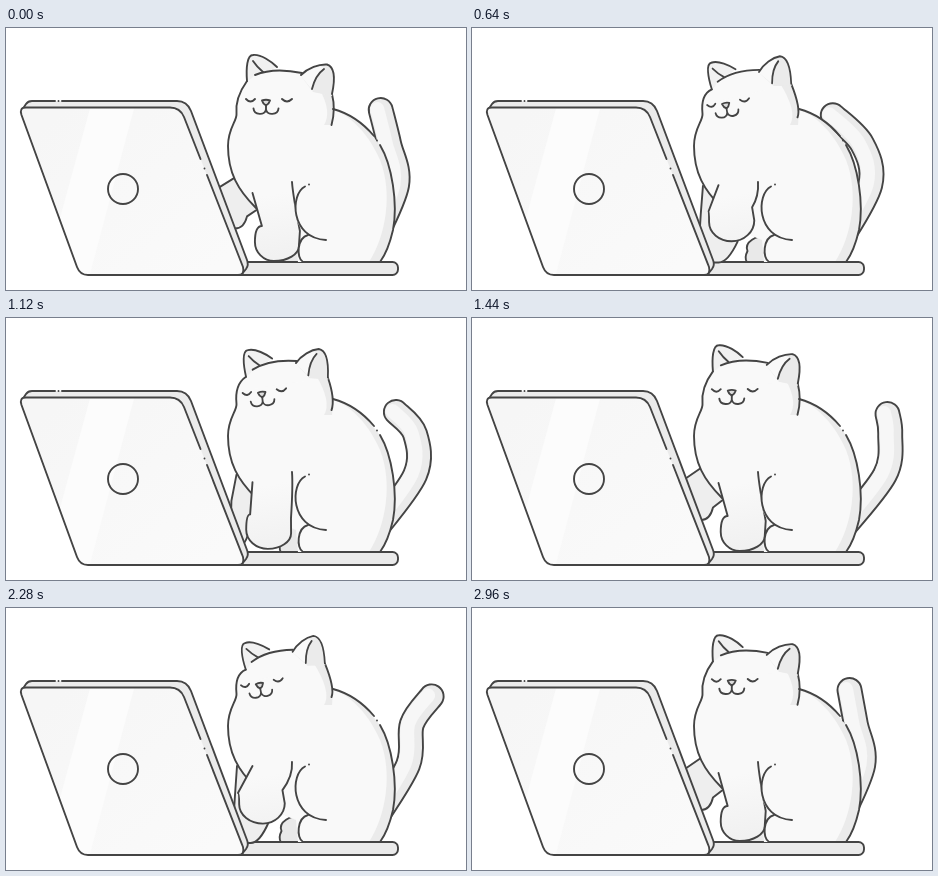
Animation, 460 px wide and 262 px high, one loop 3000 ms. Source, as an HTML page:

```html
<!DOCTYPE html>
<html lang="en">
<head>
<meta charset="utf-8">
<title>Cat kneading at a laptop</title>
<style>
html, body { margin: 0; width: 100%; height: 100%; overflow: hidden; background: #fff; }
svg { display: block; width: 460px; height: 262px; }
.line { stroke: #444; stroke-width: 1.9; }
</style>
</head>
<body>
<svg viewBox="0 0 460 262" fill="none" stroke-linecap="round" stroke-linejoin="round">
  <defs>
    <linearGradient id="legFill" gradientUnits="userSpaceOnUse" x1="258" y1="168" x2="270" y2="228">
      <stop offset="0" stop-color="#f9f9f9"/><stop offset="1" stop-color="#f1f1f1"/>
    </linearGradient>
    <linearGradient id="lidFill" gradientUnits="userSpaceOnUse" x1="60" y1="80" x2="200" y2="247">
      <stop offset="0" stop-color="#f6f6f6"/><stop offset="1" stop-color="#fafafa"/>
    </linearGradient>
  </defs>

  <path id="tailEdge" stroke="#444" stroke-width="25.9"/>
  <path id="tailShade" stroke="#ebebeb" stroke-width="22.1"/>
  <path id="tailLight" stroke="#f7f7f7" stroke-width="14" transform="translate(-3.5 -1)"/>
  <rect class="line" x="200" y="234" width="192" height="13" rx="5.5" fill="#eaeaea"/>
  <path id="farArm" class="line" fill="#eee"/>

  <g id="laptop">
    <path fill="#ebebeb" d="M16 83L20 76Q22 73 26 73H171Q181 73 185 83L241 232Q243 237 240 241L234 247Z"/>
    <path class="line" d="M16 82L20 76Q22 73 26 73H49M52.500 73h.01M56 73H171Q181 73 185 83L241 232Q243 237 240 241L236 246"/>
    <path fill="url(#lidFill)" d="M20 79.500H164Q174 79.500 178 89L237 239Q239 247 232 247H82Q74 247 71 239L15.500 87Q13 79.500 20 79.500Z"/>
    <path fill="#fcfcfc" d="M84 80.500H128L84 246H77Q73 244 71 237L54 190Z"/>
    <path class="line" d="M194.500 131L178 89Q174 79.500 164 79.500H20Q13 79.500 15.500 87L71 239Q74 247 82 247H232Q239 247 237 239L201 147M198.500 140.500h.01"/>
    <circle class="line" cx="117" cy="161" r="15"/>
  </g>

  <path class="line" fill="#e9e9e9" d="M297 208C284 207 272 214 275.500 223Q272 230 275 234H297"/>
  <path id="bodyShade" fill="#ebebeb"/>
  <path id="bodyLight" fill="#f9f9f9"/>
  <path id="chest" class="line"/>
  <path class="line" d="M327 81C342 85 357 95 368 108M371 112.500h.01M374 117C386 137 392 175 387 202C384 215 380 226 374 234"/>
  <path id="leg" class="line" fill="url(#legFill)"/>
  <path fill="#f9f9f9" d="M303 156C284 163 284 195 302 207C291 210 290 230 297 234H340V156Z"/>
  <path class="line" d="M303 156.500h.01M299 158.500C284 166 284 210 320 212M302 207C291 210 290 230 297 234H374"/>

  <g id="head">
    <path class="line" fill="#f1f1f1" d="M241 53C240 40 241 27 247 27C255 26 266 34 271 39"/>
    <path fill="#f9f9f9" d="M243 53L249 47Q268 39 296 45L300 66H243Z"/>
    <path class="line" d="M247 33Q251 39 257 44M249 47Q268 39 296 45"/>
    <path fill="#ebebeb" d="M295 48C302 40 313 36 321 36.500C329 39 329 52 326 68L307 64Z"/>
    <path fill="#f9f9f9" d="M295 48C302 40 313 36 318 40C311 45 308 52 307 63Z"/>
    <path class="line" d="M295 47C302 40 313 36 321 36.500C329 39 329 52 326 66M318 41C311 46 308 53 306 61"/>
    <g id="face" class="line">
      <path d="M240 71Q244.500 76 249 71M276 71Q281 76 286 71"/>
      <path fill="#ddd" d="M256 72.500Q260 71 264 72.500Q263 76 260 77.500Q257 76 256 72.500Z"/>
      <path d="M260 77.500V82M247.500 80.500C248 87 259 88 260 81.500C261 88 272 87 272.500 80.500"/>
    </g>
  </g>
</svg>

<script>
const byId = id => document.getElementById(id);
const draw = (id, d) => byId(id).setAttribute("d", d);

// Ticks run at 24 per second: the tail swings once per loop, the paws knead twice.
const LOOP_TICKS = 72, KNEAD_TICKS = 36;
const wave = (tick, peak, period) => Math.cos(2 * Math.PI * (tick - peak) / period);
const bump = (tick, peak) => (1 + wave(tick, peak, KNEAD_TICKS)) / 2;

function smoothPath(points) {
  const at = i => points[Math.min(points.length - 1, Math.max(0, i))];
  let d = `M${points[0]}`;
  for (let i = 0; i < points.length - 1; i++) {
    const lead = [0, 1].map(k => at(i)[k] + (at(i + 1)[k] - at(i - 1)[k]) / 6);
    const trail = [0, 1].map(k => at(i + 1)[k] - (at(i + 2)[k] - at(i)[k]) / 6);
    d += `C${lead} ${trail} ${at(i + 1)}`;
  }
  return d;
}

// The swing grows towards the tip and reaches it last.
function drawTail(tick) {
  const sway = (center, reach, lag) => center - reach * wave(tick, lag, LOOP_TICKS);
  const d = smoothPath([
    [sway(396.5, 38, 11), sway(89, 7, 0)],
    [sway(401, 19, 4), 116],
    [sway(402, 11, 1), 157],
    [366, 216]
  ]);
  ["tailEdge", "tailShade", "tailLight"].forEach(id => draw(id, d));
}

function drawLeg(lift, forward) {
  const left = 249 - forward, leftY = 214 - lift;
  const mid = 268 - 0.7 * forward, bottom = 233 - lift;
  const right = 293 - 0.9 * forward, rightY = 218 - 1.3 * lift;
  const ankle = 256 - 1.3 * forward - 0.2 * lift, ankleY = 198 - 0.75 * lift;
  const heel = 294 - forward - 0.1 * lift, heelY = 203 - 1.2 * lift;
  const ease = (a, b) => a + 0.55 * (b - a);
  draw("leg", `M246.5 ${165 - 0.4 * lift}L${ankle} ${ankleY}Q${left} ${ankleY} ${left} ${leftY}` +
    `C${left} ${ease(leftY, bottom)} ${ease(mid, left)} ${bottom} ${mid} ${bottom}` +
    `C${ease(mid, right)} ${bottom} ${right} ${ease(rightY, bottom)} ${right} ${rightY}` +
    `L${heel} ${heelY}Q287 168 286 154`);
}

function drawFarArm(lift, plant) {
  draw("farArm", `M${228 + 3 * plant} ${150 + 8 * plant}L${208 + 21 * plant} ${162 + 25 * plant}` +
    `L${215 + 11 * plant} ${205 + 30 * plant}L${229 + 0.9 * lift} ${200 + 35 * plant}` +
    `Q${238 + 0.9 * lift} ${200 + 35 * plant} ${241 + 1.25 * lift} ${188 + 26 * plant}L${252 + 0.45 * lift} 181`);
}

function drawHeadAndBody(k) {
  const angle = -14 * k, squeeze = 1 - 0.08 * k;
  const cx = 285 - 11 * k, cy = 32 - 0.5 * k;
  const cos = Math.cos(angle * Math.PI / 180), sin = Math.sin(angle * Math.PI / 180);
  const turn = (x, y) => {
    const u = (x - 285) * squeeze, v = y - 32;
    return `${cx + u * cos - v * sin} ${cy + u * sin + v * cos}`;
  };
  byId("head").setAttribute("transform",
    `translate(${cx} ${cy}) rotate(${angle}) scale(${squeeze} 1) translate(-285 -32)`);
  byId("face").setAttribute("transform", `translate(${-8.5 * k} ${-2.5 * k}) rotate(${4 * k} 262 74)`);

  const front = `M${turn(241, 53)}C${236 - 4 * k} ${60 + 5 * k} 229 72 230.5 86` +
    "C231 93 222 100 222 118C222 145 232 162 250 180";
  const cheek = `M${turn(326, 66)}C${329 - 3 * k} ${78 - 5 * k} 328 ${88 - 5 * k} 325.5 ${97 - 8 * k}`;
  const crown = `L${turn(296, 45)}Q${turn(268, 39)} ${turn(249, 47)}Z`;
  const belly = "L262 200L290 212L292 234";
  draw("bodyShade", `${front}${belly}H374C380 226 384 215 387 202C392 175 386 137 374 117` +
    `C357 95 342 85 327 81L${turn(326, 66)}${crown}`);
  draw("bodyLight", `${front}${belly}H363C380 208 387 165 374 132C364 108 345 87 327 82` +
    `L326 97H318Q326 84 ${turn(314, 62)}${crown}`);
  draw("chest", front + cheek);
}

function render(ms) {
  const step = Math.floor((ms % 3000) / 40) * 40;
  const tick = Math.floor(step * 0.024 + 0.46);
  const lift = 20 * bump(tick, 16) ** 2;
  const forward = 16 * bump(tick, 20) ** 1.5;
  const plant = 1 - (1 - bump(tick, 19)) ** 2;
  drawTail(tick);
  drawFarArm(lift, plant);
  drawLeg(lift, forward);
  drawHeadAndBody(bump(tick, 18) ** 0.7);
}

const start = performance.now();
function loop() {
  render(performance.now() - start);
  requestAnimationFrame(loop);
}
loop();
</script>
</body>
</html>
```
